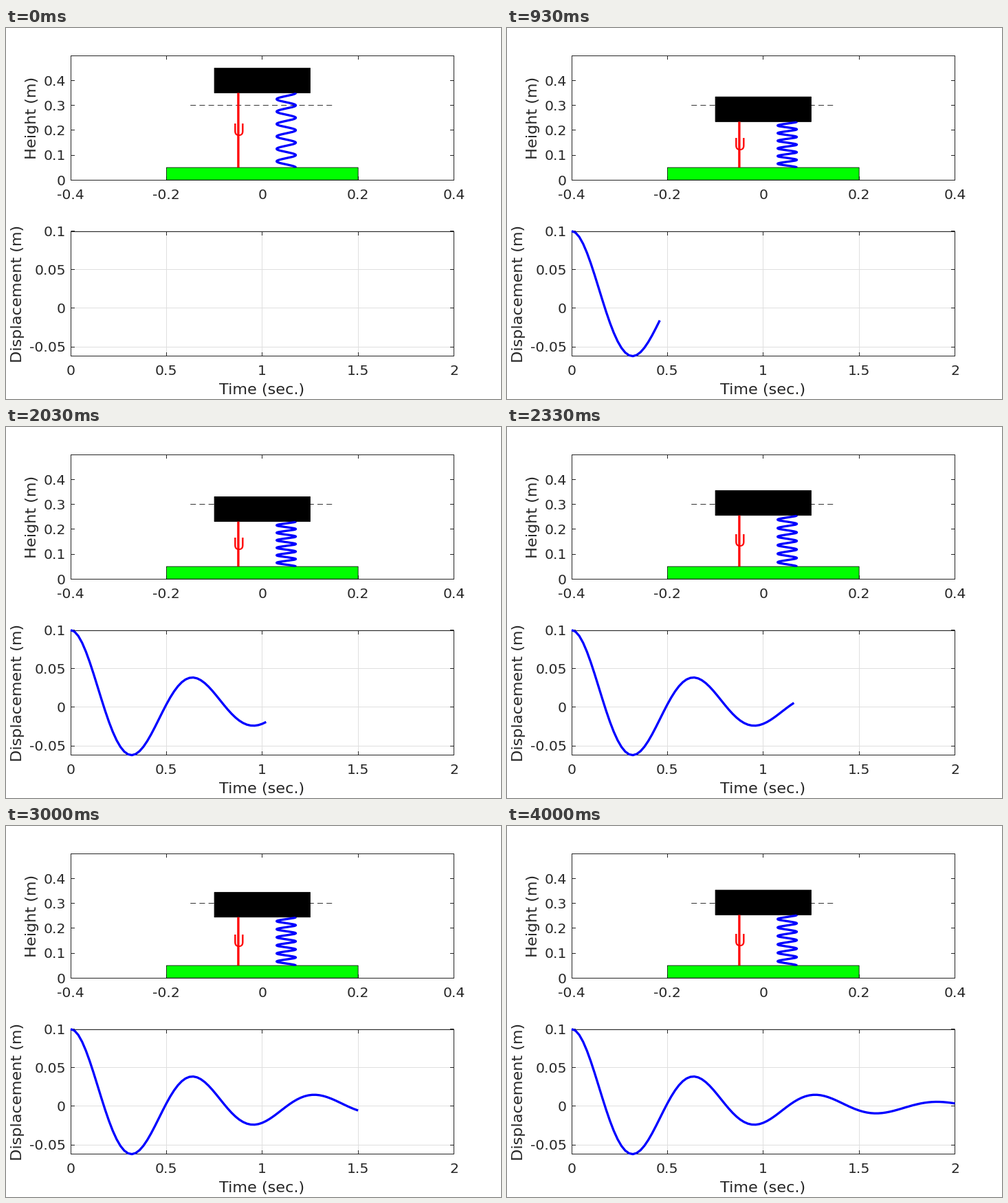
These frames come from a looping animation (720x540 px, 4030 ms). A matplotlib script:

```python
import numpy as np
import matplotlib.pyplot as plt
from matplotlib.animation import FuncAnimation
from matplotlib.collections import LineCollection
from matplotlib.patches import Rectangle

plt.rcParams["font.family"] = "DejaVu Sans"
plt.rcParams["path.snap"] = False

W, H, DPI = 720, 540, 72          # at 72 dpi one point is one pixel
LOOP, TICK, STEP = 4030, 10, 40   # ms
DARK, GRID = "0.15", "0.875"
THICK = 3.3
LEFT, RIGHT = 94, 651.5

# damped free vibration
WN, ZETA, X0, DT = 10.0, 0.15, 0.1, 0.02
REST, BASE, MASS_H = 0.25, 0.05, 0.1
WD = WN * np.sqrt(1 - ZETA**2)
t = np.arange(101) * DT
x = X0 * np.exp(-ZETA * WN * t) * (
    np.cos(WD * t) + ZETA * WN / WD * np.sin(WD * t))


def scale(lo, hi, a, b):
    return lambda v: a + (np.asarray(v) - lo) * (b - a) / (hi - lo)


px = scale(-0.4, 0.4, LEFT, RIGHT)
py = scale(0, 0.5, 221.2, 40.2)
qx = scale(0, 2, LEFT, RIGHT)
qy = scale(x.min(), X0, 477.6, 295.6)

fig = plt.figure(figsize=(W / DPI, H / DPI), dpi=DPI, facecolor="white")
ax = fig.add_axes([0, 0, 1, 1])
ax.set_xlim(0, W)
ax.set_ylim(H, 0)
ax.axis("off")


def mid(v):
    """Centre of the pixel that holds v."""
    return np.floor(float(v)) + 0.5


def lines(segs, color, z):
    ax.add_collection(LineCollection(segs, colors=color, linewidths=1, zorder=z))


def panel(fx, fy, top, bottom, xticks, yticks, label_y, grid=False):
    l, r, n = mid(LEFT), mid(RIGHT), 5.5
    top, bottom = mid(top), mid(bottom)
    marks = [[(l, top), (r, top), (r, bottom), (l, bottom), (l, top)]]
    rules = []
    for v in xticks:
        u = mid(fx(v))
        marks += [[(u, top), (u, top + n)], [(u, bottom), (u, bottom - n)]]
        rules.append([(u, top), (u, bottom)])
        ax.text(fx(v), label_y, f"{v:g}", size=20.4, color=DARK,
                ha="center", va="baseline")
    for v in yticks:
        u = mid(fy(v))
        marks += [[(l, u), (l + n, u)], [(r, u), (r - n, u)]]
        rules.append([(l, u), (r, u)])
        ax.text(87, fy(v) + 7.4, f"{v:g}", size=20.4, color=DARK,
                ha="right", va="baseline")
    if grid:
        lines(rules, GRID, 1)
    lines(marks, DARK, 2)


def label(u, v, s, angle=0):
    ax.text(u, v, s, size=22.4, color=DARK, rotation=angle, ha="center",
            va="baseline", rotation_mode="anchor")


panel(px, py, 40, 221, np.linspace(-0.4, 0.4, 5), np.arange(5) / 10, 249)
panel(qx, qy, 296, 477, np.linspace(0, 2, 5), np.arange(-1, 3) / 20, 505,
      grid=True)
label(44.4, 130.5, "Height (m)", 90)
label(23, 387, "Displacement (m)", 90)
label(372.5, 532.6, "Time (sec.)")


def block(half, y0, y1, color, z):
    r = Rectangle((px(-half), py(y1)), px(half) - px(-half), py(y0) - py(y1),
                  facecolor=color, edgecolor="black", linewidth=0.8, zorder=z)
    return ax.add_patch(r)


def stroke(color):
    return ax.plot([], [], color=color, lw=THICK, solid_capstyle="butt",
                   solid_joinstyle="round", zorder=6)[0]


block(0.2, 0, BASE, "lime", 3)
mass = block(0.1, REST, REST + MASS_H, "black", 5)
ax.plot(px([-0.15, 0.15]), [mid(py(0.3))] * 2, color="black", lw=0.8,
        dashes=(10, 6.5), dash_capstyle="butt", zorder=4)
rod, spring, trace = stroke("red"), stroke("blue"), stroke("blue")
cup = ax.text(px(-0.05) + 1, 0, "U", size=24, color="red", ha="center",
              va="baseline", zorder=7)

s = np.linspace(0, 1, 301)
coil = px(0.05 + 0.02 * np.cos(12 * np.pi * s))


def draw(n):
    k = (n + 1) * TICK // STEP
    low = REST + x[k]
    mass.set_y(py(low + MASS_H))
    rod.set_data(px([-0.05, -0.05]), py([BASE, low]))
    cup.set_y(py((BASE + low) / 2) + 8.4)
    spring.set_data(coil, py(BASE + (low - BASE) * s))
    trace.set_data(qx(t[:k + 1]), qy(x[:k + 1]))
    return mass, rod, cup, spring, trace


anim = FuncAnimation(fig, draw, frames=LOOP // TICK, interval=TICK,
                     repeat=True, repeat_delay=0, blit=False)
plt.show()
```
